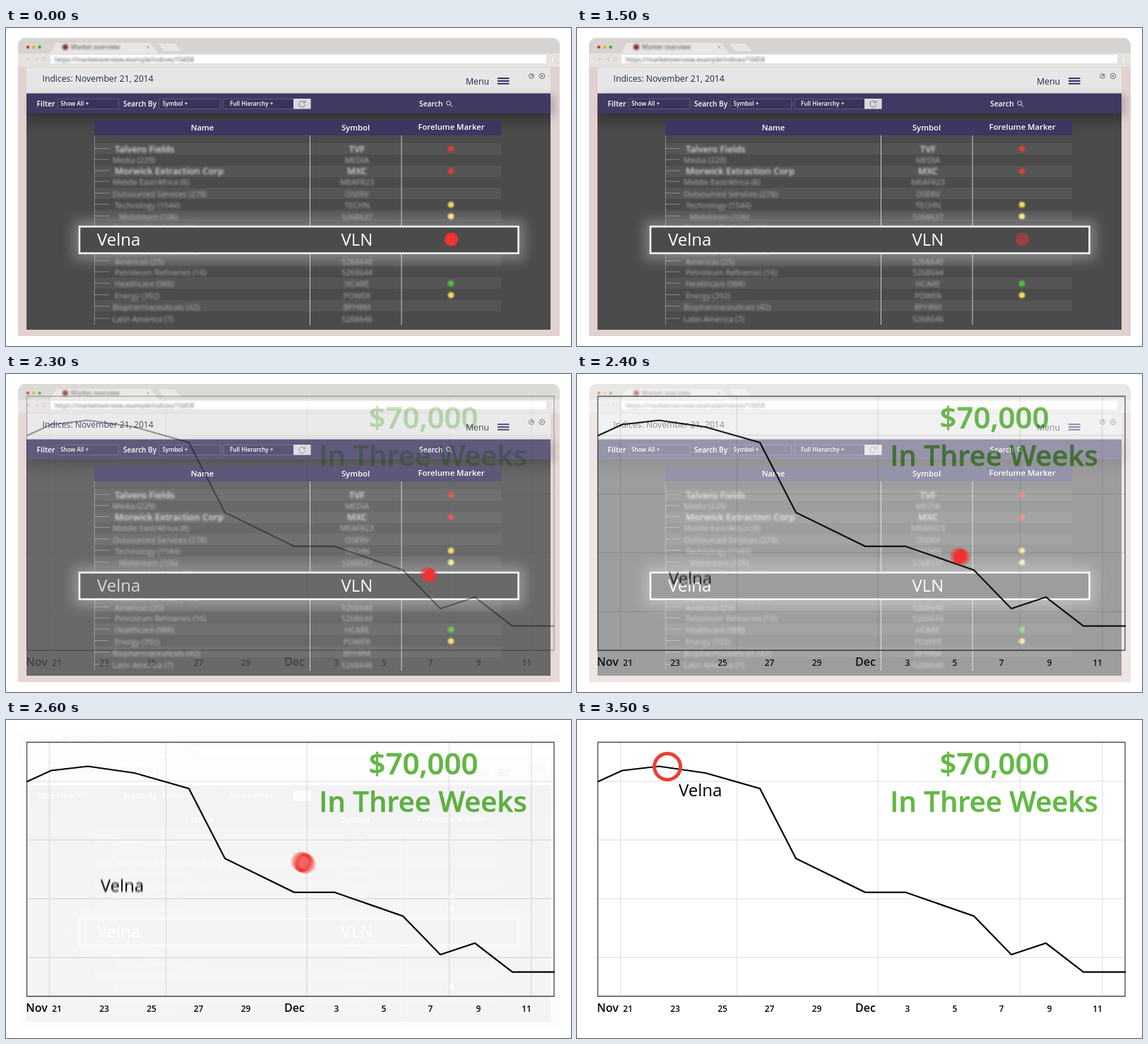
These frames come from a looping animation (800x450 px, 3600 ms). An HTML page with a canvas:

```html
<!DOCTYPE html>
<html lang="en">
<head>
<meta charset="utf-8">
<title>Signal to chart</title>
<style>
  html, body { margin: 0; width: 100%; height: 100%; overflow: hidden; background: #fff; }
  svg, canvas { position: absolute; left: 0; top: 0; width: 800px; height: 450px; }
  text { font-family: "Open Sans", "Noto Sans", sans-serif; }
  .mid { text-anchor: middle; }
  .semi { font-weight: 600; }
  .soft { filter: blur(1.4px); }
  #chart { mix-blend-mode: multiply; }
</style>
</head>
<body>
<svg id="scene" viewBox="0 0 800 450">
  <path d="M17 436V25a11 11 0 0 1 11-11H773a11 11 0 0 1 11 11V436Z" fill="#e1d1d0"/>
  <path d="M17 55V25a11 11 0 0 1 11-11H773a11 11 0 0 1 11 11V55Z" fill="#d6d3d0"/>
  <path d="M17 36H784V55H17Z" fill="#e5e2e0"/>
  <path d="M62 36L71 21H204L216 36ZM216 22H239L248 33H224Z" fill="#e8e5e3"/>
  <circle cx="31" cy="27" r="2.2" fill="#d8392d"/>
  <circle cx="39.3" cy="27" r="2.2" fill="#dfb030"/>
  <circle cx="47.6" cy="27" r="2.2" fill="#3fae3f"/>
  <path d="M199 25l4 4m0-4l-4 4" stroke="#999" stroke-width=".8"/>
  <path d="M30 44h6m-6 0l2-2m-2 2l2 2M40 44h6m0 0l-2-2m2 2l-2 2" stroke="#d0cac8" fill="none"/>
  <circle cx="54" cy="44" r="2.6" stroke="#d0cac8" fill="none"/>
  <path d="M63 38H765V50H63Z" fill="#fff"/>
  <path d="M774 41v7" stroke="#fff" stroke-width="1.6" stroke-dasharray="1.6 1.2"/>
  <g class="soft" fill="#444">
    <circle cx="84" cy="27" r="4" fill="#7c2f2f"/>
    <text x="92" y="30" font-size="9">Market overview</text>
    <text x="69" y="48" font-size="9">https://marketoverview.example/indices/10458</text>
  </g>

  <path d="M29 92H771V427H29Z" fill="#4b4b4b"/>
  <path d="M29 121H771V150H29Z" fill="url(#shade)"/>
  <path d="M29 56H771V93H29Z" fill="#e6e6e6"/>
  <path d="M29 92.5H771V121H29Z" fill="#3f3a62" style="filter:drop-shadow(6px 3px 6px #0003)"/>
  <g fill="#25254a">
    <text x="51.5" y="76" font-size="12.2">Indices: November 21, 2014</text>
    <text x="651" y="79.5" font-size="12.3">Menu</text>
  </g>
  <path d="M696 71.2h16.500M696 75h16.500M696 78.800h16.500" stroke="#2f2a60" stroke-width="2"/>
  <g fill="none" stroke="#555" stroke-width=".8">
    <circle cx="744" cy="68" r="3.500"/><path d="M742.500 69.500l3-3m-2 0h2v2"/>
    <circle cx="759" cy="68" r="3.800"/><path d="M757.300 66.300l3.400 3.400m0-3.400l-3.400 3.400"/>
  </g>
  <path d="M73.500 100.500H159.500V114.500H73.500ZM217 100.500H303.500V114.500H217ZM308 100.500H431.500V114.500H308Z" fill="#38335a" stroke="#625d80" stroke-width=".9"/>
  <path d="M407 100H431.500V114.500H407Z" fill="#d9d8de"/>
  <path d="M422 104.500a4.300 4.300 0 1 0 1.300 3.800M423.500 102.500v3h-3" fill="none" stroke="#777"/>
  <g fill="#fff">
    <g font-size="10.5" class="semi">
      <text x="43.500" y="110.500">Filter</text>
      <text x="166" y="110.500" font-size="10">Search By</text>
      <text x="585" y="111" font-size="10.300">Search</text>
    </g>
    <g font-size="8.200" class="semi">
      <text x="77" y="109.700">Show All +</text>
      <text x="221.500" y="109.700">Symbol +</text>
      <text x="317" y="109.700">Full Hierarchy +</text>
    </g>
  </g>
  <path d="M629 108.500l3 3" stroke="#fff"/>
  <circle cx="626.700" cy="106.300" r="2.900" fill="none" stroke="#fff" stroke-width=".9"/>

  <path d="M125 130H701V152H125Z" fill="#3c3760"/>
  <g class="mid semi" fill="#fff" font-size="11.300">
    <text x="278" y="145">Name</text>
    <text x="495" y="145">Symbol</text>
    <text x="630.500" y="144">Forelume Marker</text>
  </g>
  <g id="rows"></g>
  <path d="M125.300 152V420" stroke="#9a9a9a" stroke-width=".8"/>
  <path d="M430.500 152V420M560 152V420" stroke="#ccc"/>

  <path d="M96 273H734V328H96Z" fill="#fff" opacity=".3" style="filter:blur(9px)"/>
  <path d="M104 281H725.500V318.800H104Z" fill="#4b4b4b" stroke="#fff" stroke-width="2.500"/>
  <g fill="#fff" font-size="24">
    <text x="129" y="308">Velna</text>
    <text x="497" y="308" class="mid">VLN</text>
  </g>
  <linearGradient id="shade" x2="0" y2="1">
    <stop stop-color="#000" stop-opacity=".2"/>
    <stop offset="1" stop-color="#000" stop-opacity="0"/>
  </linearGradient>
</svg>

<svg id="chart" viewBox="0 0 800 450">
  <path d="M61.500 32V391M226.500 32V391M426.200 32V391M627.500 32V391M744 32V391M30 86.700H776M30 169.700H776M30 253H776M30 336.300H776" stroke="#e7e7e7" stroke-width="1.500"/>
  <path d="M29.500 31.500H776V391H29.500Z" fill="none" stroke="#484848" stroke-width="1.300"/>
  <polyline points="29,87.500 64,71.500 116,65.500 182,75 259,97 310,196 408,243.800 465,243.800 562,277.500 615,332 664,315.800 717,356.700 777,356.700" fill="none" stroke="#000" stroke-width="2.200"/>
  <g class="mid semi" fill="#62b844" stroke="#62b844" stroke-width=".5">
    <text x="591" y="77" font-size="42">$70,000</text>
    <text x="590.500" y="130" font-size="40">In Three Weeks</text>
  </g>
  <g id="axis" class="mid semi"></g>
</svg>
<canvas id="mover" width="800" height="450"></canvas>

<script>
const LOOP = 3600, SAMPLES = 8, SHUTTER = 16;
const $ = id => document.getElementById(id);

// y, x, name, symbol, signal colour, bold
const rows = [
  [171, 154, "Talvero Fields", "TVF", "#d8402f", 1],
  [186.5, 151, "Media (229)", "MEDIA"],
  [202.5, 154, "Morwick Extraction Corp", "MXC", "#d8402f", 1],
  [217.5, 151, "Middle East/Africa (8)", "MEAFR23"],
  [234, 151, "Outsourced Services (278)", "OSERV"],
  [250, 154, "Technology (1544)", "TECHN", "#eed65a"],
  [266.5, 160, "Midstream (106)", "5268637", "#eee08a"],
  [282, 151, "Chemical Products (30)", ""],
  [316, 151, "Industrial Services (184)", ""],
  [330, 154, "Americas (25)", "5268640"],
  [345.5, 154, "Petroleum Refineries (16)", "5268644"],
  [361.5, 154, "Healthcare (988)", "HCARE", "#4cc03c"],
  [378, 154, "Energy (392)", "POWER", "#eed65a"],
  [394, 151, "Biopharmaceuticals (42)", "BPHRM"],
  [411.5, 151, "Latin America (7)", "5268646"]
];
const bands = [163, 195, 226, 258, 321, 353, 385]
  .map(y => `<path d="M125 ${y}H701v16H125Z" fill="#555"/>`).join("");
$("rows").innerHTML = bands + rows.map(([y, x, name, symbol, colour, bold]) => `
  <path d="M125 ${y - .5}h21" stroke="#999" stroke-width=".8"/>
  <g class="soft" fill="${bold ? "#ddd" : "#b4b4b4"}" font-size="${bold ? 13 : 11}" font-weight="${bold ? 600 : 400}">
    <text x="${x}" y="${y + 4.5}">${name}</text>
    <text x="497" y="${y + 4.5}" class="mid">${symbol}</text>
  </g>` + (colour ? `
  <circle cx="630" cy="${y}" r="5.5" fill="${colour}" opacity=".35"/>
  <circle cx="630" cy="${y}" r="3.6" fill="${colour}"/>` : "")).join("");

const ticks = { Nov: 43.5, 21: 72, 23: 139, 25: 206, 27: 272.5, 29: 339.5, Dec: 408.5, 3: 468, 5: 535, 7: 601, 9: 669, 11: 737 };
$("axis").innerHTML = Object.entries(ticks).map(([label, x]) =>
  `<text x="${x}" y="412.5" font-size="${isNaN(label) ? 16 : 12}">${label}</text>`).join("");

// Smooth curve through [time, value] keys, at rest at both ends
function curve(keys) {
  const last = keys.length - 1;
  const slope = i => i === 0 || i === last ? 0 :
    (keys[i + 1][1] - keys[i - 1][1]) / (keys[i + 1][0] - keys[i - 1][0]);
  return t => {
    if (t <= keys[0][0]) return keys[0][1];
    if (t >= keys[last][0]) return keys[last][1];
    const i = keys.findIndex(k => k[0] > t) - 1;
    const [t0, a] = keys[i], [t1, b] = keys[i + 1];
    const d = t1 - t0, u = (t - t0) / d, s = u * u * (3 - 2 * u);
    return a + (b - a) * s + d * u * (1 - u) * (slope(i) * (1 - u) - slope(i + 1) * u);
  };
}
const sceneAlpha = curve([[2200, 1], [2400, .54], [2500, .23], [2680, 0]]);
const chartAlpha = curve([[2200, 0], [2400, .9], [2500, 1]]);
const nameAlpha = curve([[2250, 0], [2400, .75], [2500, 1]]);
const ringPath = curve([[2200, 0], [2400, .174], [2500, .304], [3000, .826], [3400, 1]]);
const namePath = curve([[2280, 0], [2400, .05], [2500, .196], [3000, .8], [3350, 1]]);
const ringFill = curve([[2400, 1], [2500, .9], [3000, .16], [3150, 0]]);
const mix = (a, b, p) => a + (b - a) * p;

const ctx = $("mover").getContext("2d");
ctx.font = '24px "Open Sans", "Noto Sans", sans-serif';
ctx.globalCompositeOperation = "lighter";
ctx.lineWidth = 5;

function drawMover(t, alpha, pulse) {
  const p = ringPath(t), r = mix(9.5, 21, p);
  const x = mix(630.5, 128, p), y = mix(299, 66, p);
  ctx.fillStyle = ctx.strokeStyle = `rgb(${mix(244, 232, p)}, ${mix(48, 64, p)}, ${mix(48, 56, p)})`;
  const arc = radius => { ctx.beginPath(); ctx.arc(x, y, radius, 0, 7); };
  ctx.globalAlpha = alpha * pulse;
  arc(r - 2.5);
  ctx.stroke();
  ctx.globalAlpha *= ringFill(t);
  arc(r - 5);
  ctx.fill();

  const q = namePath(t);
  ctx.globalAlpha = alpha * nameAlpha(t);
  ctx.fillStyle = "#000";
  ctx.fillText("Velna", mix(129, 144, q), mix(308, 108, q));
}

function frame(now) {
  const t = now % LOOP;
  $("scene").style.opacity = sceneAlpha(t);
  $("chart").style.opacity = chartAlpha(t);
  const pulse = t < 2200 ? .675 + .325 * Math.cos(t / 1100 * 2 * Math.PI) : 1;
  ctx.clearRect(0, 0, 800, 450);
  // Averaged samples give the motion blur
  for (let i = 0; i < SAMPLES; i++) {
    drawMover(t + ((i + .5) / SAMPLES - .5) * SHUTTER, 1 / SAMPLES, pulse);
  }
  requestAnimationFrame(frame);
}
requestAnimationFrame(frame);
</script>
</body>
</html>
```
